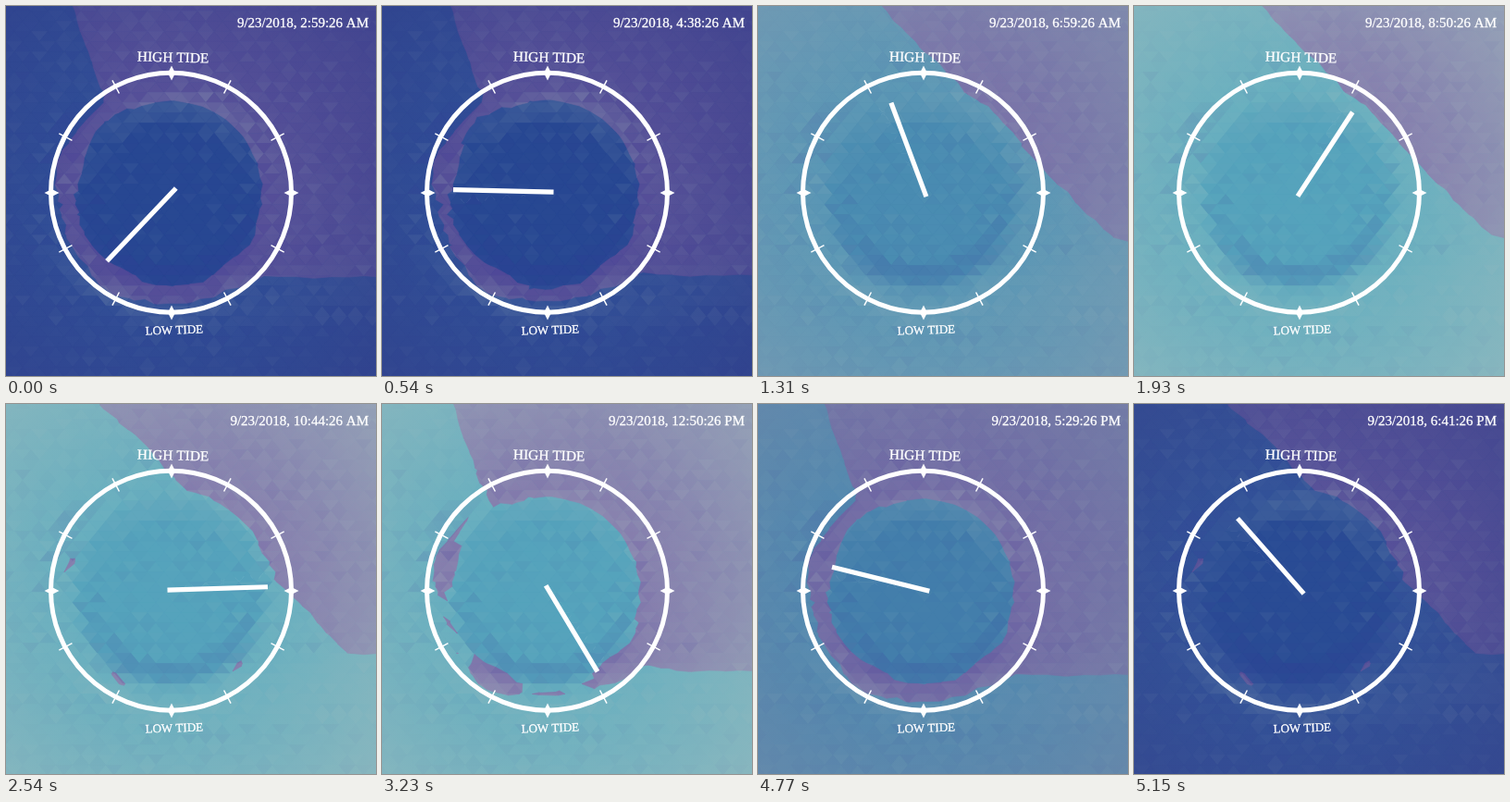
Recreate the animation shown at these times as an HTML page with a canvas. Size 400x400 px, loop 5230 ms.

```html
<!DOCTYPE html>
<html lang="en">
<head>
<meta charset="utf-8">
<title>Tide clock</title>
<style>
html, body { margin: 0; width: 100%; height: 100%; overflow: hidden; background: #2f4a93; }
canvas { display: block; width: 400px; height: 400px; }
</style>
</head>
<body>
<canvas id="stage" width="400" height="400"></canvas>
<script>
const ctx = document.getElementById('stage').getContext('2d');
const LOOP = 5230, STEP = LOOP / 68, SERIF = '"Liberation Serif", "Times New Roman", serif';
const CX = 178, CY = 201, CELL_W = 18, CELL_H = 11;

const night = { water: [47, 77, 150], pool: [39, 71, 146], land: [86, 80, 152], haze: [50, 60, 136] };
const day = { water: [104, 175, 191], pool: [85, 163, 188], land: [133, 125, 173], haze: [160, 188, 190] };
const LIT = [170, 192, 192], SHADE = [55, 45, 150];

// Minutes since the first reading, water level.
const tide = [[0, .2], [183, .26], [240, .85], [330, .95], [465, .6], [700, 0], [870, .2], [942, .6]];

const clamp = (v, lo = 0, hi = 1) => Math.max(lo, Math.min(hi, v));
const mix = (a, b, k) => a.map((v, i) => v + (b[i] - v) * k);
const rgb = (c, alpha = 1) => `rgba(${c.map(Math.round)},${alpha})`;
const shaded = (c, s) => s > 0 ? mix(c, LIT, s) : mix(c, SHADE, -s);

function waterLevel(min) {
  const i = Math.max(1, tide.findIndex(p => p[0] >= min));
  const [a, from] = tide[i - 1], [b, to] = tide[i];
  return from + (to - from) * (min - a) / (b - a);
}

// A sloping coast with a crater whose rim has three peaks.
function height(x, y) {
  const u = x - y - 105;
  const coast = Math.min((x - 60 - .35 * y) / 60, (305 - y) / 60, .6 + u / (u > 0 ? 110 : 300));
  const r = Math.hypot(x - CX, y - CY), a = Math.atan2(y - CY, x - CX);
  const peak = Math.cos(a - 2.1) > 0 ? Math.max(0, Math.cos(5 * (a - .855))) ** 3 : 0;
  const rim = (.3 + .42 * peak) * (1 - ((r - 112) / 18) ** 2);
  const bowl = (r - 94) / 22;
  return clamp(Math.min(Math.max(coast, rim), bowl), -.65, 1.2);
}

function seeded(seed) {
  return () => (seed = (seed * 16807) % 2147483647) / 2147483647;
}

function buildFacets() {
  const rand = seeded(71), rows = Math.ceil(400 / CELL_H) + 2, cols = Math.ceil(400 / CELL_W) + 3;
  const grid = Array.from({ length: rows }, (_, r) => Array.from({ length: cols }, (_, c) => {
    const x = (c - 1 + (r % 2) / 2) * CELL_W, y = (r - .5) * CELL_H, n = rand() * 2 - 1;
    return { x, y, n, h: height(x, y) + .03 * n };
  }));
  const facets = [];
  // a and b share a row; c is the corner above or below them.
  const add = (a, b, c) => {
    const slope = ((a.h + b.h) / 2 - c.h) / (a.y - c.y);
    const r = Math.hypot((a.x + b.x + c.x) / 3 - CX, (a.y + b.y + c.y) / 3 - CY);
    facets.push({
      points: [a, b, c],
      shade: clamp(-slope * 4.5, -.3, .25) + .055 * (a.n + b.n - 2 * c.n) / 2,
      pool: clamp((108 - r) / 12)
    });
  };
  for (let r = 0; r < rows - 1; r++) for (let c = 0; c < cols - 1; c++) {
    const [a, b] = grid[r].slice(c, c + 2), [d, e] = grid[r + 1].slice(c, c + 2);
    if (r % 2) { add(a, b, e); add(d, e, a); }
    else { add(a, b, d); add(d, e, b); }
  }
  return facets;
}
const facets = buildFacets();

// The part of a polygon standing above the water.
function above(points, level) {
  return points.flatMap((p, i) => {
    const q = points[(i + 1) % points.length], out = p.h >= level ? [p] : [];
    if ((p.h >= level) !== (q.h >= level)) {
      const k = (level - p.h) / (q.h - p.h);
      out.push({ x: p.x + (q.x - p.x) * k, y: p.y + (q.y - p.y) * k });
    }
    return out;
  });
}

function polygon(points, color) {
  ctx.beginPath();
  for (const p of points) ctx.lineTo(p.x, p.y);
  ctx.closePath();
  ctx.fillStyle = ctx.strokeStyle = color;
  ctx.fill();
  ctx.stroke();
}

function scene(min) {
  const level = waterLevel(min);
  const sun = clamp((min - 180) / 80) * clamp((948 - min) / 130);
  const tone = name => mix(night[name], day[name], sun);
  const water = tone('water'), pool = tone('pool'), land = tone('land'), haze = tone('haze');

  ctx.lineWidth = .6;
  for (const f of facets)
    polygon(f.points, rgb(shaded(mix(water, pool, f.pool), f.shade * .75)));
  for (const f of facets) {
    const dry = above(f.points, level);
    if (dry.length) polygon(dry, rgb(shaded(land, f.shade)));
  }

  const fade = ctx.createRadialGradient(CX, CY, 110, CX, CY, 290);
  fade.addColorStop(0, rgb(haze, 0));
  fade.addColorStop(1, rgb(haze, .55));
  ctx.fillStyle = fade;
  ctx.fillRect(0, 0, 400, 400);
}

function label(text, x, y, size, turn = 0, align = 'center') {
  ctx.save();
  ctx.translate(x, y);
  ctx.rotate(turn * Math.PI / 180);
  ctx.font = `${size}px ${SERIF}`;
  ctx.textAlign = align;
  ctx.lineWidth = .3;
  ctx.fillText(text, 0, 0);
  ctx.strokeText(text, 0, 0);
  ctx.restore();
}

function dial(min) {
  ctx.fillStyle = ctx.strokeStyle = '#fff';
  ctx.lineWidth = 5;
  ctx.beginPath();
  ctx.ellipse(178.5, 201.7, 130, 129.5, 0, 0, 7);
  ctx.stroke();

  for (let i = 0; i < 12; i++) {
    const a = i * Math.PI / 6;
    ctx.save();
    ctx.translate(179, 202);
    ctx.rotate(a - .045 * Math.sin(4 * a));
    ctx.translate(0, -129.5);
    ctx.beginPath();
    if (i % 3) ctx.rect(-.75, -8, 1.5, 16);
    else for (const [x, y] of [[-4, 0], [0, -8], [4, 0], [0, 8]]) ctx.lineTo(x, y);
    ctx.fill();
    ctx.restore();
  }

  label('HIGH TIDE', 180.5, 60.5, 15.4, 1.5);
  label('LOW TIDE', 182, 354.5, 13, -2);

  ctx.save();
  ctx.translate(180, 201);
  ctx.rotate((223.5 + min * 360 / 745) * Math.PI / 180);
  ctx.fillRect(-2.6, -103, 5.2, 108.5);
  ctx.restore();
}

function clock(min) {
  const now = 179 + min, hour = Math.floor(now / 60);
  const minute = String(now % 60).padStart(2, '0');
  label(`9/23/2018, ${hour % 12 || 12}:${minute}:26 ${hour < 12 ? 'AM' : 'PM'}`, 392, 23, 15, 0, 'right');
}

let shown = -1;
function tick() {
  const step = Math.floor((performance.now() % LOOP + 7) / STEP) % 68;
  if (step !== shown) {
    const min = 3 * Math.round(step * 4.685);
    scene(min);
    dial(min);
    clock(min);
    shown = step;
  }
  requestAnimationFrame(tick);
}
tick();
</script>
</body>
</html>
```
